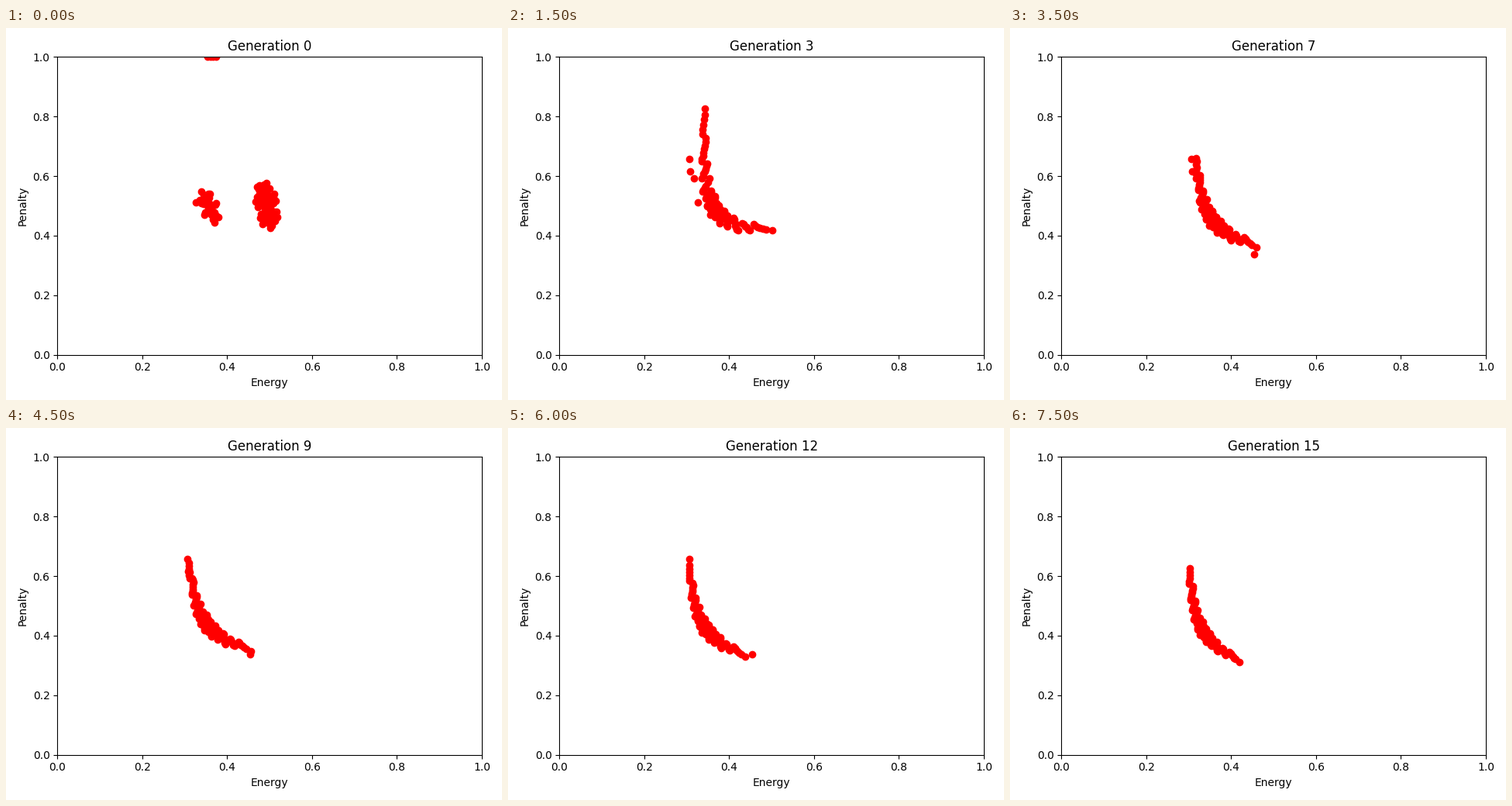
A matplotlib script that plays this animation: 640x480 px, repeating every 8000 ms.

```python
import numpy as np
import matplotlib.pyplot as plt
from matplotlib.animation import FuncAnimation

W, H, GENS, STEP_MS = 640, 480, 16, 500
SETTLED = 3            # generation in which the front is fully formed
FRONT_SIZE = 95

fig, ax = plt.subplots(figsize=(W / 100, H / 100), dpi=100)
ax.set(xlim=(0, 1), ylim=(0, 1), xlabel="Energy", ylabel="Penalty")
title = ax.set_title("Generation 0")
fig.tight_layout()
fig.canvas.draw()
to_data = ax.transData.inverted()
dots, = ax.plot([], [], "ro")

# Front at key generations: top end, corner and right end in stage pixels
KEYS = [3, 5, 9, 15]
ENDS = np.array([
    [(253, 96), (249, 260), (346, 259)],
    [(243, 157), (252, 254), (325, 277)],
    [(234, 169), (250, 266), (320, 287)],
    [(230, 177), (240, 272), (300, 302)],
], float)

# Long-lived individuals: x, y, first and last generation
ELITES = [(234, 169, 3, 13), (235, 185, 3, 9), (240, 194, 2, 9),
          (245, 225, 0, 8), (315, 292, 5, 13)]


def spread(n):
    """Two even, independent number sequences in 0..1."""
    i = np.arange(1, n + 1)
    return i * 0.7549 % 1, i * 0.5698 % 1


def blob(cx, cy, rx, ry, lean, n):
    """Leaning elliptical cluster, denser towards its centre."""
    u, v = spread(n)
    r, a = u ** 0.6, 2 * np.pi * v
    dy = ry * r * np.sin(a)
    return np.c_[cx + rx * r * np.cos(a) + lean * dy, cy + dy]


def front(gen, n):
    """Dots around a rational Bezier curve, crowded near its corner."""
    p0, p1, p2 = (np.array([np.interp(gen, KEYS, ENDS[:, k, c])
                            for c in (0, 1)]) for k in range(3))
    u, v = spread(n)
    c = 2 * u - 1
    t = (0.5 + 0.5 * np.sign(c) * np.abs(c) ** 1.3)[:, None]
    a, b, d = (1 - t) ** 2, 4 * t * (1 - t), t ** 2
    curve = (a * p0 + b * p1 + d * p2) / (a + b + d)
    tangent = (1 - t) * (p1 - p0) + t * (p2 - p1)
    normal = tangent[:, ::-1] * (-1, 1)
    normal /= np.linalg.norm(normal, axis=1, keepdims=True)
    width = 2 + np.interp(gen, (3, 15), (7, 4)) * np.sin(np.pi * t ** 1.3)
    return curve + normal * width * (2 * v[:, None] - 1)


def population(gen):
    grown = min(gen / SETTLED, 1)
    old = 1 - grown
    parts = [front(gen, round(FRONT_SIZE * grown)),
             blob(262, 230, 12, 23, 0.3, round(26 * old)),
             blob(336, 229, 14, 32, 0.15, round(60 * old))]
    if gen == 0:
        parts.append(np.c_[np.linspace(260, 271, 4), np.full(4, 37)])
    parts += [[(x, y)] for x, y, born, last in ELITES if born <= gen <= last]
    return np.vstack(parts)


def draw(gen):
    px = population(gen)
    px[:, 1] = H - px[:, 1]
    dots.set_data(*to_data.transform(px).T)
    title.set_text(f"Generation {gen}")
    return dots, title


anim = FuncAnimation(fig, draw, frames=GENS, interval=STEP_MS,
                     repeat=True, repeat_delay=0, blit=False)
plt.show()
```
